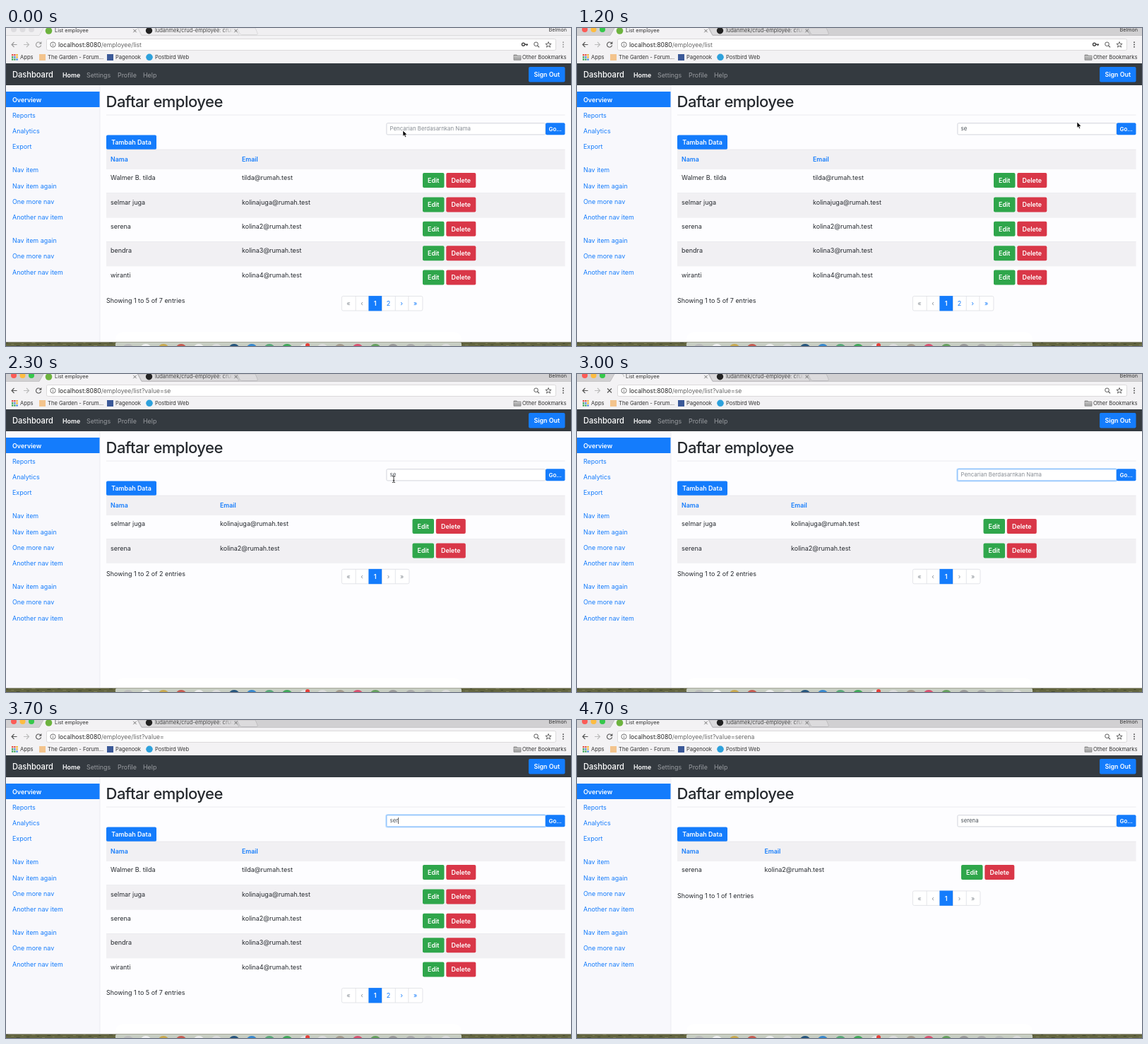
An HTML page that plays this animation: 800 px wide and 450 px high, repeating every 4.8 s.

```html
<!DOCTYPE html>
<html lang="id">
<head>
<meta charset="utf-8">
<title>List employee</title>
<style>
  html, body { margin: 0; width: 100%; height: 100%; overflow: hidden; }
  svg { display: block; width: 800px; height: 450px; font-family: Inter, sans-serif; }
  text { white-space: pre; }
</style>
</head>
<body>
<svg viewBox="0 0 800 450"><g id="fixed"></g><g id="live"></g></svg>
<script>
const LOOP = 4800, STEP = 100;
const BLUE = '#147cfc', INK = '#25292e', GREY = '#868c93';

const staff = [
  ['Walmer B. tilda', 'tilda@rumah.test'],
  ['selmar juga', 'kolinajuga@rumah.test'],
  ['serena', 'kolina2@rumah.test'],
  ['bendra', 'kolina3@rumah.test'],
  ['wiranti', 'kolina4@rumah.test']
];
// email and button columns by number of rows
const columns = { 5: [334, 590], 2: [303, 575.5], 1: [265.5, 544] };

// [start time, value]
const typed = [[0, ''], [600, 's'], [800, 'se'], [2500, ''], [3400, 's'], [3600, 'se'],
  [3700, 'ser'], [3900, 'sere'], [4000, 'seren'], [4100, 'serena']];
const inFront = [[0, false], [200, true]];
const focus = [[0, false], [200, true], [1100, false], [2400, true], [3100, false], [3300, true], [4400, false]];
const loading = [[0, false], [1500, true], [1700, false], [2900, true], [3100, false], [4200, true], [4400, false]];
const query = [[0, null], [1700, 'se'], [3100, ''], [4400, 'serena']];
const pointer = [[0, 'arrow'], [200, 'beam'], [600, ''], [900, 'beam'], [1000, 'arrow'], [2000, 'beam'],
  [2500, ''], [3200, 'beam'], [3400, '']];
const path = [[0, 562, 145], [200, 560, 143], [900, 560, 143], [1200, 708, 133], [1400, 775, 142],
  [1700, 775, 142], [2300, 549, 149], [2400, 549, 147], [3400, 552, 145], [LOOP, 552, 145]];

const entry = (list, t) => list.filter(e => e[0] <= t).pop();
const at = (list, t) => entry(list, t)[1];

const rect = (x, y, w, h, fill, rx = 0, more = '') =>
  `<rect x="${x}" y="${y}" width="${w}" height="${h}" fill="${fill}" rx="${rx}" ${more}/>`;
const circle = (x, y, r, fill) => `<circle cx="${x}" cy="${y}" r="${r}" fill="${fill}"/>`;
const ring = (x, y, r, stroke, width) =>
  `<circle cx="${x}" cy="${y}" r="${r}" fill="none" stroke="${stroke}" stroke-width="${width}"/>`;
const line = (d, stroke, width = 1, more = '') =>
  `<path d="${d}" fill="none" stroke="${stroke}" stroke-width="${width}" ${more}/>`;
const text = (x, y, s, size = 9, fill = INK, weight = 400, more = '') =>
  `<text x="${x}" y="${y}" font-size="${size}" fill="${fill}" font-weight="${weight}" ${more}>${s}</text>`;
const middle = 'text-anchor="middle"';
const button = (x, y, w, h, label, fill, size = 8.9) =>
  rect(x, y, w, h, fill, 2) + text(x + w / 2, y + h / 2 + size * .37, label, size, '#fff', 600, middle);
const cross = (x, y, r, stroke, width) =>
  line(`M${x - r} ${y - r}l${2 * r} ${2 * r}m0 ${-2 * r}l${-2 * r} ${2 * r}`, stroke, width);

const ruler = document.createElement('canvas').getContext('2d');
ruler.font = '7.85px Inter, sans-serif';

function browserBar(t) {
  const front = at(inFront, t);
  const [strip, tab, edge, icon] = front
    ? ['#d1d0d2', '#dcdbdd', '#b5b4b6', '#555'] : ['#f0eff1', '#efeef0', '#d2d1d3', '#999'];
  let s = rect(0, 0, 800, 11, strip) + rect(0, 10, 800, 40, '#f3f2f4');
  s += `<path d="M192 10L187 0H324L330 10z" fill="${tab}" stroke="${edge}" stroke-width=".7"/>`;
  s += `<path d="M327 0L331 8Q332 9.500 334 9.500H355Q357 9.500 356 7L353 0z" fill="${tab}" stroke="${edge}" stroke-width=".7"/>`;
  s += '<path d="M47 11L53 0H186L192 11z" fill="#f3f2f4"/>';
  s += line('M0 10.500H47L53 0M186 0L192 10.500H800', edge, .7);
  ['#fc5b56', '#fdbc40', '#34c84a'].forEach((c, i) => s += circle(11 + 12.5 * i, 2, 4, front ? c : '#dedde0'));
  s += text(69, 6.3, 'List employee', 7.3, '#333') + cross(182.5, 4, 2.2, '#666', .9);
  s += circle(202.5, 3.8, 4.7, '#222');
  s += `<linearGradient id="fade" gradientUnits="userSpaceOnUse" x1="306" x2="322"><stop stop-color="#444"/><stop offset="1" stop-color="${tab}"/></linearGradient>`;
  s += text(211, 6.3, 'ludanmek/crud-employee: crud', 7.5, 'url(#fade)') + cross(325.5, 4, 2.2, '#666', .9);
  s += text(794, 4.8, 'Belmon', 7.2, '#333', 400, 'text-anchor="end"');

  s += line('M15.500 23.500H8M11.500 20L8 23.500L11.500 27', icon, 1.1);
  s += line('M25 23.500H32.500M29 20L32.500 23.500L29 27', '#bbb', 1.1);
  s += rect(57.5, 15.5, 721, 16, '#fff', 2, 'stroke="#d3d2d4" stroke-width=".8"');
  s += ring(66.5, 23.5, 3.6, '#666', .9) + line('M66.500 23V25.500M66.500 21.200V22.100', '#666', .9);
  s += ring(750.5, 22.8, 2.8, '#555', 1) + line('M752.500 24.800L755 27.300', '#555', 1.2);
  s += line('M768 19.500L769.100 22.300L772.100 22.400L769.700 24.300L770.600 27.200L768 25.500L765.400 27.200L766.300 24.300L763.900 22.400L766.900 22.300z', '#555', .9);
  [20.3, 23.5, 26.7].forEach(y => s += circle(789, y, .95, icon));

  const dots = ['#e35045', '#e35045', '#f0b429', '#3aa757', '#4285e0', '#f0b429', '#3aa757', '#3aa757', '#4285e0'];
  dots.forEach((c, i) => s += rect(8 + i % 3 * 3.2, 37 + (i / 3 | 0) * 3.2, 2.3, 2.3, c));
  s += rect(47, 37, 9, 9, '#f3c48d') + rect(143, 37, 9, 9, '#3b5998') + circle(203, 41.3, 4.8, '#2da1dc');
  [[20, 'Apps'], [59, 'The Garden - Forum...'], [155, 'Pagenook'], [211, 'Postbird Web'], [731, 'Other Bookmarks']]
    .forEach(([x, name]) => s += text(x, 44, name, 7.6, '#333'));
  s += '<path d="M719 38H723L724 39.200H729V45.300H719z" fill="#aaa" stroke="#777" stroke-width=".7"/>';
  s += line('M719 40.700H729', '#eee', .6);

  const q = at(query, t);
  s += text(74, 26.7, `localhost:8080<tspan fill="#666">/employee/list${q === null ? '' : '?value=' + q}</tspan>`, 8.6, '#222');
  if (at(loading, t)) {
    s += cross(46, 23.5, 3, icon, 1.1);
    s += line('M62 -.500A4.500 4.500 0 0 1 66.500 4', '#bbb', 1.2, `transform="rotate(${t * .36 % 360} 62 4)"`);
  } else {
    s += line('M49 21.500A3.600 3.600 0 1 0 49.600 24.300', icon, 1.1) + `<path d="M50.300 19V22.700H46.600z" fill="${icon}"/>`;
    s += circle(60.5, 4, 4.8, '#6db33f');
  }
  if (q === null) s += ring(732.5, 23.3, 2, '#444', 1.4) + line('M734.500 23.300H739M737.500 23.300V25.300', '#444', 1.4);
  return s;
}

function page() {
  let s = rect(0, 50, 800, 394, '#fdfdff') + rect(155, 430, 490, 20, '#fff', 10);
  s += rect(0, 81, 133, 363, '#f8f8fc') + rect(132.5, 81, .8, 363, '#e9e9ed') + rect(0, 50, 800, 31, '#343a40');
  s += text(9, 70.3, 'Dashboard', 11.1, '#fff', 500);
  [[80, 'Home'], [114, 'Settings'], [158, 'Profile'], [194, 'Help']]
    .forEach(([x, name], i) => s += text(x, 69.7, name, 8.9, i ? '#999ca0' : '#fff', i ? 400 : 600));
  s += button(740, 55, 51.5, 21.5, 'Sign Out', BLUE);

  s += rect(0, 90, 132.5, 22, BLUE);
  ['Overview', 'Reports', 'Analytics', 'Export', '', 'Nav item', 'Nav item again', 'One more nav',
    'Another nav item', '', 'Nav item again', 'One more nav', 'Another nav item']
    .reduce((y, name, i) => {
      s += text(9, y, name, 8.95, i ? BLUE : '#fff', i ? 400 : 600);
      return y + (name ? 22.15 : 11.2);
    }, 104.6);

  s += text(141.5, 112.2, 'Daftar employee', 22, INK, 500, 'letter-spacing="-.5"');
  s += rect(142, 122.7, 649.5, .7, '#e4e4e8');
  return s + button(142, 151.5, 71, 20.5, 'Tambah Data', BLUE);
}

function dock() {
  let s = rect(0, 444, 800, 6, '#62643f') + rect(0, 444, 800, .8, '#aaaaa2');
  for (let i = 0; i < 110; i++) {
    s += rect(i * 7.3, 445 + i * 37 % 5, 3 + i % 3, 1, i % 2 ? '#7c7e56' : '#43492f');
  }
  s += rect(155, 444.8, 490, 8, '#c8cec3', 2);
  const icons = ['#bbb', '#f2f2f2', '#c9a94f', '#c55a50', '#eee', '#ddd', '#23537c', '#3587ce', '#58a878',
    '#3ea858', '#e8e8e8', '#ddd', '#a49a8d', '#d95070', '#64a05d', '#999', '#aaa', '#b8bbb8', '#ddd'];
  icons.forEach((c, i) => s += circle(173 + i * 25, 455, 8, c));
  return s + circle(427, 449, 3, '#e53e38');
}

function searchBox(t) {
  const value = at(typed, t), active = at(focus, t);
  let s = active ? rect(537.3, 133.2, 228, 19.2, '#bfdeff', 2.5) : '';
  s += rect(538.9, 134.7, 225, 16.2, '#fff', 1.5, `stroke="${active ? '#6fb2fb' : '#cdd1d8'}" stroke-width=".9"`);
  s += text(543.5, 145.4, value || 'Pencarian Berdasarnkan Nama', 7.85, value ? '#4d545b' : GREY);
  s += button(764, 134.3, 27.5, 17, 'Go...', BLUE, 7.9);
  const since = t - Math.max(entry(typed, t)[0], entry(focus, t)[0]);
  if (active && since % 1000 < 500) s += rect(543.6 + ruler.measureText(value).width, 138, .8, 9, '#333');
  return s;
}

function table(t) {
  const q = at(query, t) || '', rows = staff.filter(r => r[0].startsWith(q)), n = rows.length;
  const [mailX, editX] = columns[n], height = 34.4, end = 199 + n * height;
  let s = rect(142, 172, 649.5, 27, '#f1f0f3') + rect(142, 171.7, 649.5, .7, '#e4e4e8');
  s += text(148, 188.6, 'Nama', 8.8, BLUE, 600) + text(mailX, 188.6, 'Email', 8.8, BLUE, 600);
  rows.forEach(([name, mail], i) => {
    const y = 199 + i * height;
    if (i % 2) s += rect(142, y, 649.5, height, '#f1f0f3');
    s += rect(142, y, 649.5, .6, '#e8e8ec');
    s += text(148, y + 16.1, name) + text(mailX, y + 16.1, mail);
    s += button(editX, y + 6, 30.5, 21, 'Edit', '#2fa64b') + button(editX + 33.3, y + 6, 42, 21, 'Delete', '#d93748');
  });
  s += text(142, end + 18.2, `Showing 1 to ${n} of ${q ? n : 7} entries`, 8.95);

  const labels = q ? ['«', '‹', '1', '›', '»'] : ['«', '‹', '1', '2', '›', '»'];
  const top = end + 8.5, width = q ? 95.5 : 114.5;
  s += rect(475.4, top, width, 20.5, '#fff', 2, 'stroke="#dddfe4" stroke-width=".8"');
  labels.forEach((label, i) => {
    const left = i ? 476 + i * 18.7 : 475, right = i === labels.length - 1 ? 475 + width : 476 + (i + 1) * 18.7;
    if (i) s += rect(left, top, .8, 20.5, '#dddfe4');
    if (i === 2) s += rect(left, top - .4, 18.9, 21.3, BLUE);
    const fill = i === 2 ? '#fff' : i < 2 || q ? GREY : BLUE;
    s += text((left + right) / 2, top + 13.6, label, 9, fill, i === 2 ? 600 : 400, middle);
  });
  return s;
}

function mouse(t) {
  const kind = at(pointer, t);
  if (!kind) return '';
  const [t0, x0, y0] = entry(path, t), [t1, x1, y1] = path.find(p => p[0] > t);
  const k = (t - t0) / (t1 - t0), x = x0 + (x1 - x0) * k, y = y0 + (y1 - y0) * k;
  const shape = kind === 'arrow'
    ? '<path d="M0 0V8.200L1.900 6.500L3.200 9.400L4.600 8.800L3.400 6H6z" fill="#000" stroke="#fff" stroke-width=".6"/>'
    : line('M-2 -4.500Q0 -4.500 0 -3.500Q0 -4.500 2 -4.500M0 -3.500V3.500M-2 4.500Q0 4.500 0 3.500Q0 4.500 2 4.500M-1.200 1.500H1.200', '#222', .9);
  return `<g transform="translate(${x} ${y})">${shape}</g>`;
}

const fixed = document.getElementById('fixed'), live = document.getElementById('live');
fixed.innerHTML = page() + dock();
const start = performance.now();
let shown = -1;

function draw() {
  const t = Math.floor((performance.now() - start) % LOOP / STEP) * STEP;
  if (t !== shown) live.innerHTML = browserBar(t) + table(t) + searchBox(t) + mouse(t);
  shown = t;
  requestAnimationFrame(draw);
}
draw();
</script>
</body>
</html>
```
